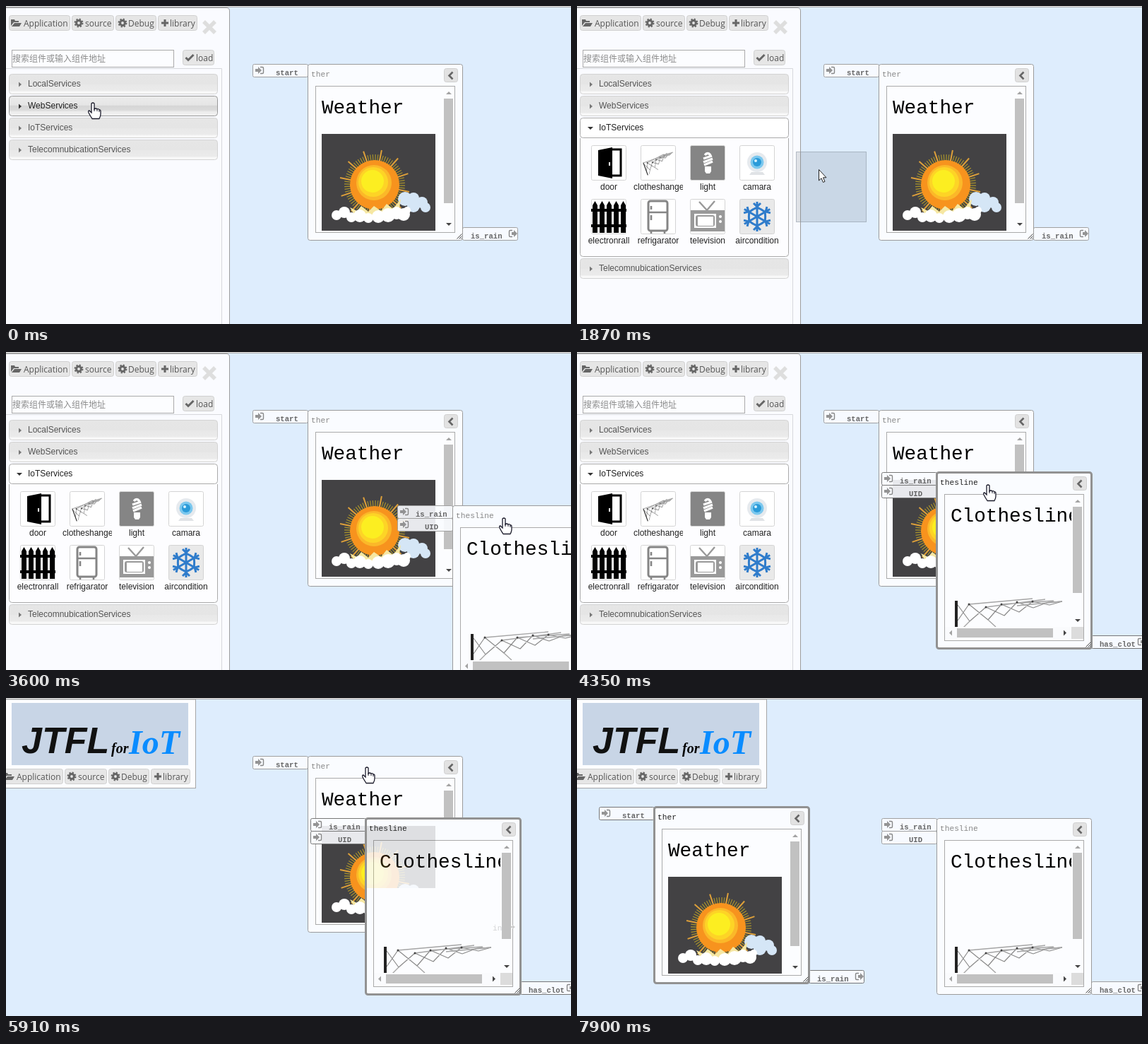
These frames come from a looping animation (800x450 px, 8460 ms). An HTML page:

```html
<!DOCTYPE html>
<html lang="en">
<head>
<meta charset="utf-8">
<title>Component editor</title>
<style>
html, body { margin: 0; width: 100%; height: 100%; overflow: hidden; background: #deedfd; }
svg { display: block; width: 800px; height: 450px; }
text { white-space: pre; }
.btn { font: 12px "Open Sans", "Noto Sans", sans-serif; fill: #555; }
.ui { font: 12px "Liberation Sans", Arial, sans-serif; fill: #555; }
.cjk { font: 12px "Noto Sans CJK SC", "Noto Sans CJK", sans-serif; fill: #8c8c8c; }
.h1 { font: 27.7px "Liberation Mono", monospace; fill: #000; }
.title { font: 11.2px "Liberation Mono", monospace; fill: #888; }
.port { font: bold 10.6px "Liberation Mono", monospace; fill: #555; }
.dark { fill: #222; }
.box { fill: #fafcff; stroke: #a0a0a0; }
.frame { fill: #fafcff; stroke: #9b9b9b; }
.on .frame { stroke: #929292; stroke-width: 3; }
.on .title { fill: #222; }
.on .box { stroke: #777; }
.head rect { fill: url(#plain); stroke: #d3d3d3; }
.head.hover rect { fill: url(#lit); stroke: #999; }
.head.open rect { fill: #fff; stroke: #aaa; }
.head .down, .head.open .right { display: none; }
.head.open .down { display: inline; }
.head.hover text, .head.open text { fill: #212121; }
.head.hover path, .head.open path { fill: #333; }
</style>
</head>
<body>
<svg id="stage" viewBox="0 0 800 450"></svg>
<script>
const LOOP = 8460;
const rect = (x, y, w, h, a = '') => `<rect x="${x}" y="${y}" width="${w}" height="${h}" ${a}/>`;
const text = (x, y, cls, s, a = '') => `<text x="${x}" y="${y}" class="${cls}" ${a}>${s}</text>`;
const path = (d, a = '') => `<path d="${d}" ${a}/>`;
const circle = (x, y, r, a = '') => `<circle cx="${x}" cy="${y}" r="${r}" ${a}/>`;
const group = (x, y, s, a = '') => `<g transform="translate(${x} ${y})" ${a}>${s}</g>`;
const line = (d, c, w = 1) => path(d, `fill="none" stroke="${c}" stroke-width="${w}"`);

// Glyph-like icons, centred on their origin
const icon = {
  folder: path('M-7 4V-5H-2L-1-3H4V-1H-3ZM-2 0H8L5 5H-6Z', 'fill="#666"'),
  cog: circle(0, 0, 3.4, 'fill="none" stroke="#666" stroke-width="3"') +
       circle(0, 0, 5.4, 'fill="none" stroke="#666" stroke-width="2.2" stroke-dasharray="2.2 2.04"'),
  plus: line('M-5 0H5M0-5V5', '#666', 3),
  check: line('M-5.5 0L-2 3.5L5.5-4', '#666', 3),
  into: path('M-6-2H-2V-5L3 0L-2 5V2H-6Z', 'fill="#888"') + line('M1-4.5H4Q5.5-4.5 5.5-3V3Q5.5 4.5 4 4.5H1', '#888', 1.4),
  out: path('M-2-2H1V-5L6 0L1 5V2H-2Z', 'fill="#888"') + line('M-1-4.5H-4Q-5.5-4.5-5.5-3V3Q-5.5 4.5-4 4.5H-1', '#888', 1.4)
};

function toolbar() {
  return [[4, 87, 'folder', 'Application', 21], [93, 60, 'cog', 'source', 19],
          [155, 58, 'cog', 'Debug', 18], [215, 56, 'plus', 'library', 17]]
    .map(([x, w, ic, label, dx]) => button(x, 13, w, ic, label, dx)).join('');
}

function button(x, y, w, ic, label, dx) {
  return rect(x + .5, y + .5, w - 1, 21, 'rx="3" fill="#e6e6e6" stroke="#d0d0d0"') +
    group(x + 10, y + 11, icon[ic]) + text(x + dx, y + 16, 'btn', label);
}

function header(i, label) {
  return group(4, 96 + 31 * i,
    rect(.5, .5, 295, 28, 'rx="4"') +
    path('M14 11.5V18.5L18 15Z', 'class="right" fill="#777"') +
    path('M11 13H19L15 17Z', 'class="down"') +
    text(27, 18, 'ui', label), `id="head${i}" class="head"`);
}

// Scissor arms of a drying rack, reaching right from a wall post
function rack(k = 1) {
  const top = [[4, 8], [20, 7], [44, 11], [66, 7], [88, 4], [110, 3], [132, 4], [152, 3]];
  const low = [[4, 30], [21, 31], [47, 29], [70, 23], [91, 18], [111, 12], [134, 8], [152, 3]];
  let x = '';
  for (let i = 0; i < 7; i++)
    x += `M${top[i]}L${low[i + 1]}M${low[i]}L${top[i + 1]}`;
  return line(x, '#8a8a8a', 1.2 * k) +
    line('M20 7L110-1M44 11L128 0M66 7L140 2M88 9L152 3M47 29L58 39M21 31L10 42', '#a5a5a5', 1.4 * k) +
    top.slice(1, 6).map(p => circle(p[0], p[1], 1.5 * k, 'fill="#444"')).join('') +
    rect(0, 2, 4, 42, 'fill="#222"');
}

function weatherImage() {
  const rays = (n, r0, r1) => {
    let d = '';
    for (let i = 0; i < n; i++) {
      const a = Math.PI * 2 * i / n + .2, c = Math.cos(a), s = Math.sin(a);
      d += `M${(75 + r0 * c).toFixed(1)} ${(72 + r0 * s).toFixed(1)}L${(75 + r1 * c).toFixed(1)} ${(72 + r1 * s).toFixed(1)}`;
    }
    return d;
  };
  const puffs = (list, c) => list.map(p => circle(p[0], p[1], p[2], `fill="${c}"`)).join('');
  return rect(0, 0, 161, 137, 'fill="#434244"') +
    line(rays(72, 34, 43), '#a8932c', 1.2) + line(rays(12, 34, 50), '#dc9f3a', 2) +
    circle(75, 72, 35, 'fill="#f7931e"') + circle(74, 69, 25, 'fill="#fbb829"') +
    circle(73, 68, 21, 'fill="#fdd426"') + circle(72, 67, 16, 'fill="#fcee21"') +
    puffs([[118, 92, 10], [130, 91, 8], [142, 97, 8], [147, 104, 7], [130, 102, 9]], '#d5e6f6') +
    path('M40 104L48 118H108L112 92L101 106L92 99L84 109L74 102L66 110L56 102L50 109Z', 'fill="#f6e7a2"') +
    puffs([[21, 115, 7], [32, 111, 8], [42, 118, 7], [54, 116, 9], [66, 119, 7], [80, 117, 9],
           [94, 115, 10], [106, 112, 9], [116, 114, 9], [121, 108, 5]], '#fff');
}

function vbar(x, up, thumb, h, down) {
  return rect(x, thumb, 13, h, 'fill="#c1c1c1"') +
    path(`M${x + 3} ${up + 2}h8l-4-4Z`, 'fill="#a3a3a3"') +
    path(`M${x + 3} ${down - 2}h8l-4 4Z`, 'fill="#444"');
}

function port(x, y, label, tx, ic, ix) {
  return group(x, y, rect(.5, .5, 78, 18, 'class="box" rx="2"') +
    text(tx, 16, 'port', label) + group(ix, 9, icon[ic]));
}

function panel(id, title, ins, out, body) {
  return `<g id="${id}">` +
    `<g class="ports" fill-opacity=".9">` + ins.map(([s, tx], i) => port(-78, 18 * i, s, tx, 'into', 10)).join('') +
    port(219, 231, out, 12, 'out', 72) + '</g>' +
    rect(.5, .5, 219, 249, 'class="frame" rx="3"') +
    text(5, 18, 'title', title) +
    rect(193.5, 6.5, 19, 19, 'rx="3" fill="#e2e2e2" stroke="#d0d0d0"') +
    line('M205.5 11.5L200.5 16.5L205.5 21.5', '#666', 2.6) +
    rect(11.5, 31.5, 197, 207, 'fill="#fcfdff" stroke="#aaa"') +
    `<g class="body" clip-path="url(#view)">${body}</g>` +
    line('M211.5 247.5L218.5 240.5M214.5 247.5L218.5 243.5M217 247.5L218.5 246', '#444') + '</g>';
}

const tile = (name, art, bg = '#fff') => ({ name, art: rect(.5, .5, 49, 49, `rx="2" fill="${bg}" stroke="#d4d4d4"`) + art });
let fence = '', flake = '';
for (let i = 0; i < 5; i++) fence += `M${2 + i * 10} 48V9L${5.5 + i * 10} 3L${9 + i * 10} 9V48Z`;
for (let i = 0; i < 6; i++)
  flake += `<g transform="rotate(${i * 60})">${line('M0 0V-21M-5-19L0-14L5-19M-6-10L0-13L6-10', '#2f7ccb', 3)}</g>`;
const tiles = [
  tile('door', path('M10 7L30 3V47L10 43Z') + line('M29 6H42V43H30', '#000', 3) + rect(25, 24, 2, 5, 'fill="#fff"')),
  tile('clotheshanger', group(3, 24, `<g transform="rotate(-20) scale(.29 .45)">${rack(1.8)}</g>`) +
    line('M4 25L46 10', '#aaa', 1.2)),
  tile('light', path('M21 30H30V37L28 40H23L21 37Z', 'fill="#fff"') +
    line('M21 14Q25 9 29 14M19 19L31 15M19 24L32 19M20 28L32 23', '#fff', 3.4), '#858585'),
  tile('camara', circle(25, 24, 14, 'fill="#e6eaee"') + circle(25, 24, 9.5, 'fill="#7cc8ee"') +
    circle(25, 24, 6, 'fill="#2b9bd9"') + circle(23, 22, 2, 'fill="#d8f2ff"') + path('M17 38H33L36 42H14Z', 'fill="#e0e3e6"')),
  tile('electronrall', path(fence + 'M0 14H50V18H0ZM0 36H50V40H0Z')),
  tile('refrigarator', rect(11, 3, 27, 42, 'rx="3" fill="#fff" stroke="#858585" stroke-width="3"') +
    line('M11 19H38M15 10V15M15 23V30M15 45V49M34 45V49', '#858585', 2.6)),
  tile('television', rect(1, 16, 48, 30, 'fill="#999"') + rect(6, 21, 31, 20, 'fill="#fff"') +
    rect(8, 23, 27, 16, 'rx="3" fill="#999"') + rect(11, 25, 22, 13, 'fill="#fff"') +
    line('M13 4L24 16L35 3', '#999', 2.4) + circle(43, 25, 2, 'fill="#fff"') + circle(43, 32, 2, 'fill="#fff"')),
  tile('aircondition', group(25, 25, flake), '#e9e9e9')
];

const stage = document.getElementById('stage');
const stops = list => list.map(([o, c]) => `<stop offset="${o}" stop-color="${c}"/>`).join('');
stage.innerHTML = `<defs>
  <linearGradient id="plain" x2="0" y2="1">${stops([[0, '#e6e6e6'], [.5, '#e5e5e5'], [.5, '#e8e8e8'], [.84, '#ebebeb'], [.88, '#f8f8f8']])}</linearGradient>
  <linearGradient id="lit" x2="0" y2="1">${stops([[0, '#ececec'], [.45, '#e6e6e6'], [.5, '#d6d6d6'], [.7, '#dadada'], [.8, '#ededed'], [1, '#f2f2f2']])}</linearGradient>
  <clipPath id="view">${rect(12, 32, 196, 206)}</clipPath>
  <clipPath id="fold">${rect(4, 187, 296, 0, 'id="foldRect"')}</clipPath>
  <clipPath id="label">${rect(-10, 0, 70, 80)}</clipPath>
  <clipPath id="smear">${rect(64, 0, 97, 88)}</clipPath></defs>` +
  rect(0, 0, 800, 450, 'fill="#deedfd"') +
  rect(0, 0, 800, 1, 'fill="#e6e6e6"') + rect(0, 1, 800, 1, 'fill="#ababab"') +
  '<g id="panels">' +
  panel('weather', 'ther', [['start', 33]], 'is_rain',
    text(20, 70, 'h1', 'Weather') + group(20, 99, weatherImage()) + vbar(193, 41, 49, 148, 227)) +
  panel('rack', 'thesline', [['is_rain', 26], ['UID', 39]], 'has_clot',
    text(20, 70, 'h1', 'Clothesline') + group(26, 180, rack()) +
    rect(191, 32, 17, 187, 'fill="#fcfdff"') + vbar(193, 41, 49, 122, 210) +
    rect(12, 219, 196, 19, 'fill="#fafbfd"') + rect(29, 221, 136, 13, 'fill="#c1c1c1"') +
    rect(191, 219, 17, 17, 'fill="#dcdcdc"') +
    path('M22 223.5V231.5L18 227.5Z', 'fill="#a3a3a3"') + path('M180 223.5V231.5L184 227.5Z', 'fill="#444"')) +
  '</g><g id="trail">' +
  group(447, 181, weatherImage(), 'clip-path="url(#smear)" opacity=".15"') +
  text(689, 329, 'title', 'in', 'opacity=".35"') + path('M717 321v2h-2v2h2v2l4-3Z', 'fill="#ccc"') + '</g>' +
  '<g id="side">' +
  path('M-1 2.5H312Q316.5 2.5 316.5 7V451H-1Z', 'fill="#fafbff" stroke="#9c9c9c"') + toolbar() +
  rect(275.5, 12.5, 25, 34, 'id="ring" rx="2" fill="#fafbff" stroke="#a9cbee"') +
  path('M280 22L296 38M296 22L280 38', 'id="close" stroke-width="5.5"') +
  rect(8.5, 62.5, 229, 24, 'fill="#fcfdff" stroke="#aaa"') + text(9, 79, 'cjk', '搜索组件或输入组件地址') +
  button(250, 62, 45, 'check', 'load', 19) +
  line('M0 88.5H305.5V450', '#d6d8dc') +
  ['LocalServices', 'WebServices', 'IoTServices', 'TelecomnubicationServices'].map((s, i) => header(i, s)).join('') +
  '<g id="content" clip-path="url(#fold)">' + rect(4.5, 180, 295, 1, 'id="bodyBox" rx="4" fill="#fdfdff" stroke="#aaa"') +
  tiles.map((t, i) => `<g class="tile">${t.art}` + (i === 1
    ? text(-10, 63, 'ui dark', t.name, 'clip-path="url(#label)"')
    : text(25, 63, 'ui dark', t.name, 'text-anchor="middle"')) + '</g>').join('') +
  `<g id="bar">${vbar(284, 196, 204, 81, 336)}</g></g></g>` +
  '<g id="mini">' + rect(-1, 2, 269.5, 125.5, 'fill="#fcfdff" stroke="#a6a6a6"') +
  rect(8, 7, 250, 88, 'fill="#c8d5e6"') +
  text(22, 78, '', 'JTFL', 'font-family="Liberation Sans, Arial, sans-serif" font-size="52" font-weight="bold" font-style="italic" fill="#111"') +
  '<g font-family="Liberation Serif, serif" font-weight="bold" font-style="italic">' +
  text(149, 78, '', 'for', 'font-size="20"') + text(174, 79, '', 'IoT', 'font-size="48" fill="#0a8cff"') + '</g>' +
  group(-10, 87, toolbar()) + '</g>' +
  rect(.5, .5, 99, 99, 'id="ghost" fill="#757f85" fill-opacity=".2" stroke="#8d98a3" stroke-opacity=".6"') +
  '<g id="cursor">' +
  path('M.5.5V16L4 12.7L6.5 18.5L9 17.4L6.5 11.8H11Z', 'id="arrow" fill="#fff" stroke="#222"') +
  '<g id="hand">' + path('M-2 1Q0-1 2 1V9Q4 7 6 9Q8 8 9 10Q11 9.5 11 12V16Q11 19 9 22.5H-1Q-4 18 -6 14Q-7 11 -5 11L-2 14Z',
    'fill="#fff" stroke="#1b1b2b" stroke-width="1.3"') + line('M2 8V12M6 9V12M9 10V13', '#1b1b2b') + '</g></g>';

// Each step changes part of the state: c = cursor, g = drag ghost, w and r = panel places
const steps = [
  [0, { c: ['hand', 123, 137], hover: 1, fold: 0, w: [427, 82], side: 0 }],
  [150, { c: ['hand', 123, 148] }], [280, { c: ['hand', 123, 162], hover: 2 }],
  [415, { c: ['hand', 122, 168] }], [550, { fold: 30, hover: -1 }],
  [680, { fold: 80, c: ['hand', 122, 175] }], [815, { fold: 125 }],
  [950, { fold: 148, c: ['arrow', 122, 188] }], [1080, { fold: 159, c: ['arrow', 122, 193] }],
  [1200, { fold: 168, c: ['arrow', 122, 205] }], [1320, { c: ['arrow', 122, 222] }],
  ...[[90, 197], [170, 201], [310, 206], [450, 213], [560, 222], [648, 229], [632, 211]]
    .map(([x, y], i) => [1600 + 135 * i, { g: [x, y], c: ['arrow', x + 32, y + 25] }]),
  [2940, { g: null, r: [632, 217] }], [3210, { loaded: true }],
  [3480, { c: ['hand', 688, 236] }], [3600, { c: ['hand', 705, 235] }],
  ...[[620, 212], [585, 198], [535, 178], [509, 170]]
    .map(([x, y], i) => [3900 + 145 * i, { r: [x, y], active: 'rack', c: ['hand', x + 73, y + 18] }]),
  [4480, { trail: true, c: ['arrow', 540, 160] }], [4630, { c: ['arrow', 420, 105] }],
  [4770, { c: ['arrow', 325, 55] }], [4920, { c: ['hand', 286, 34], ring: true }],
  [5040, { c: ['hand', 282, 29] }],
  [5310, { side: -110 }], [5430, { side: -230 }],
  [5560, { side: null, c: ['arrow', 330, 52] }], [5730, { c: ['arrow', 440, 84] }],
  [5910, { c: ['hand', 511, 98] }],
  ...[[425, 82], [385, 90], [325, 105], [265, 122], [215, 138], [182, 148]]
    .map(([x, y], i) => [6160 + 138 * i, { w: [x, y], active: 'weather', trail: false, c: ['hand', x + 84, y + 16] }]),
  ...[[160, 160], [130, 172], [112, 160], [109, 154]]
    .map(([x, y], i) => [7120 + 130 * i, { w: [x, y], c: ['hand', x + 84, y + 16] }]),
  [7640, { c: ['arrow', 420, 290] }], [7770, { c: ['arrow', 711, 405] }], [7900, { c: null }]
];

const $ = id => document.getElementById(id);
const show = (el, on) => { el.style.display = on ? '' : 'none'; };
const move = (el, p) => { show(el, p); if (p) el.setAttribute('transform', `translate(${p[0]} ${p[1]})`); };
const tileEls = [...document.querySelectorAll('.tile')];

function render(s) {
  move($('weather'), s.w);
  move($('rack'), s.r);
  for (const id of ['weather', 'rack']) $(id).classList.toggle('on', s.active === id);
  $('panels').append($(s.active || 'rack'));
  for (const part of ['.ports', '.body']) show($('rack').querySelector(part), s.loaded);
  show($('trail'), s.trail);
  move($('ghost'), s.g);

  const open = s.side !== null;
  move($('side'), open && [s.side, 0]);
  show($('mini'), !open);
  show($('ring'), s.ring);
  $('close').setAttribute('stroke', s.ring ? '#a6a6a6' : '#dedede');
  for (let i = 0; i < 4; i++) {
    $('head' + i).classList.toggle('hover', s.hover === i);
    $('head' + i).classList.toggle('open', i === 2 && s.fold > 0);
  }
  const full = s.fold === 168, cols = full ? 4 : 3;
  show($('content'), s.fold);
  $('foldRect').setAttribute('height', s.fold);
  $('bodyBox').setAttribute('height', s.fold + 6.5);
  move($('head3'), [4, 189 + s.fold]);
  tileEls.forEach((el, i) => move(el, [20 + 70 * (i % cols), (full ? 197 : 196) + 76 * Math.floor(i / cols)]));
  show($('bar'), !full);

  move($('cursor'), s.c && s.c.slice(1));
  if (s.c) for (const id of ['arrow', 'hand']) show($(id), s.c[0] === id);
}

let last = -1;
const begin = performance.now();
function tick() {
  const t = (performance.now() - begin) % LOOP;
  const past = steps.filter(k => k[0] <= t);
  if (past.length !== last) {
    last = past.length;
    render(Object.assign({}, ...past.map(k => k[1])));
  }
  requestAnimationFrame(tick);
}
tick();
</script>
</body>
</html>
```
